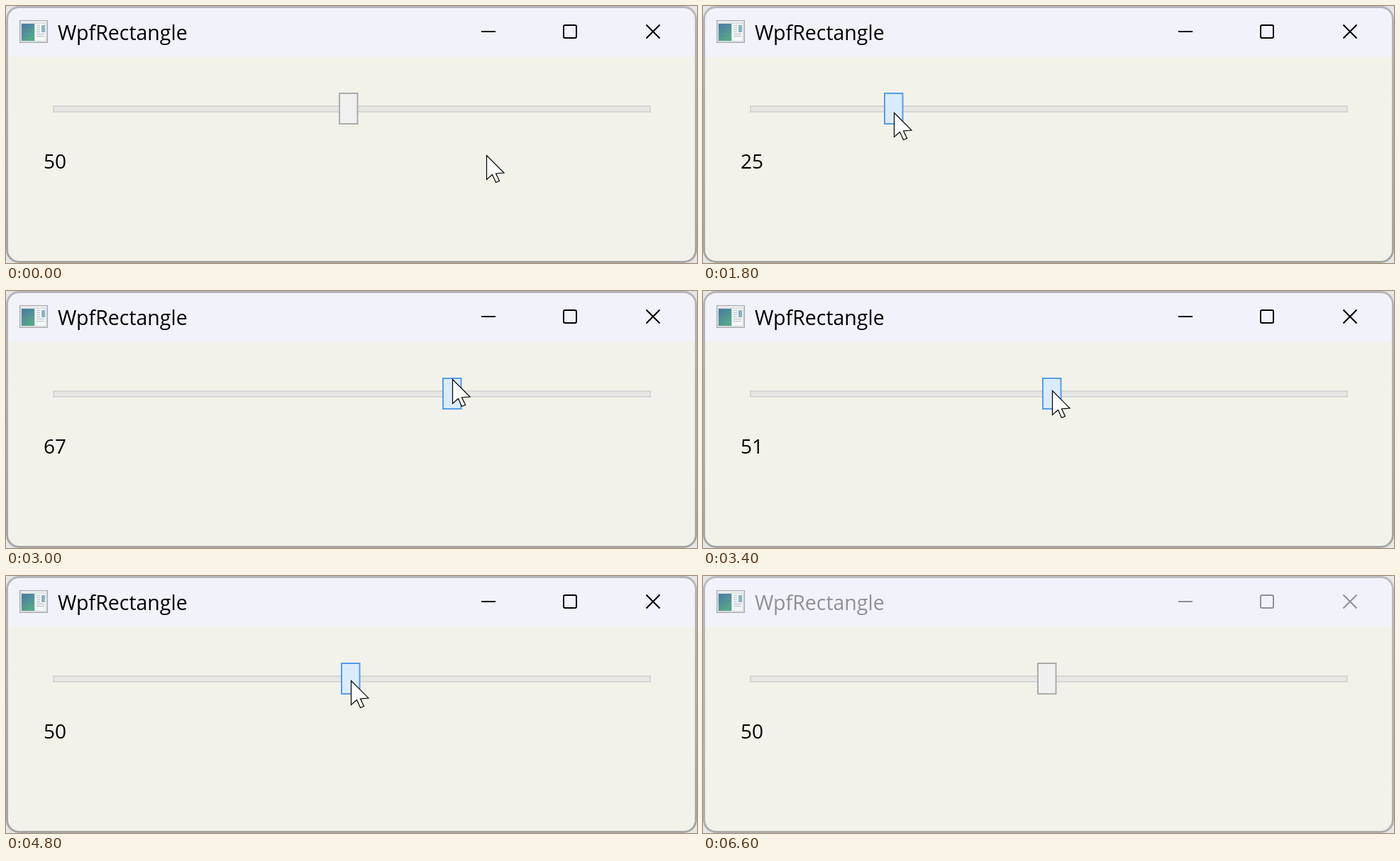
An HTML page for the animation above (6.8 s loop, 974 px wide and 362 px high).

```html
<!DOCTYPE html>
<html lang="en">
<head>
<meta charset="utf-8">
<title>Slider window</title>
<style>
  html, body { margin: 0; width: 100%; height: 100%; overflow: hidden; background: #e6e6e6; }
  svg { display: block; width: 974px; height: 362px; }
  text { font-family: "Open Sans", "Noto Sans", sans-serif; }
  #chrome { --ink: #000; }
  #chrome text { fill: var(--ink); font-size: 28.5px; }
  #chrome path, #chrome rect { fill: none; stroke: var(--ink); stroke-width: 2; }
  #thumb { stroke-width: 2; }
  .normal { fill: #f0f0f1; stroke: #acacac; }
  .hover { fill: #dcebfc; stroke: #7eb4ea; }
  .pressed { fill: #daecfc; stroke: #569de5; }
</style>
</head>
<body>
<svg viewBox="0 0 974 362">
  <defs>
    <linearGradient id="pane" x2="0.6" y2="1">
      <stop stop-color="#4a78a8"/><stop offset="1" stop-color="#55a886"/>
    </linearGradient>
    <linearGradient id="edge" x2="0" y2="1">
      <stop stop-color="#b6b6ba"/><stop offset="1" stop-color="#a6a6a6"/>
    </linearGradient>
    <clipPath id="frame"><rect x="1" y="1" width="972" height="360" rx="17"/></clipPath>
  </defs>

  <g clip-path="url(#frame)">
    <rect width="974" height="362" fill="#f2f2ea"/>
    <rect width="974" height="71.5" fill="#f2f2fb"/>
  </g>
  <rect id="border" x="1.5" y="1.5" width="971" height="359" rx="17" fill="none" stroke="url(#edge)" stroke-width="3"/>

  <g id="icon">
    <rect x="19.5" y="20.5" width="39" height="31" fill="#d6d9dc" stroke="#a3a6a9"/>
    <rect x="21" y="21" width="36" height="3" fill="#e9ebed"/>
    <rect x="22" y="25" width="18" height="24" fill="url(#pane)"/>
    <rect x="41" y="25" width="15" height="24" fill="#f4f6f7"/>
    <path d="M43 27.500h5M43 30.500h5M43 33.500h5M43 36.500h5M43 39.500h11M43 42.500h11" stroke="#b4bcc4"/>
    <rect x="50" y="27" width="5" height="10" fill="#86b6c4"/>
  </g>

  <g id="chrome">
    <text x="73" y="48">WpfRectangle</text>
    <path d="M670 36h20M902.500 26.500l19 19m0-19l-19 19"/>
    <rect x="786" y="27" width="18" height="18" rx="2"/>
  </g>

  <rect x="67" y="141" width="841" height="8" fill="#e8e7e4" stroke="#d7d6d6" stroke-width="2"/>
  <rect id="thumb" y="123" width="25.500" height="43"/>
  <text id="value" x="53" y="229" font-size="28"></text>
  <path id="cursor" d="M0 0V34L8 27L13 38L18 36L13 25.500L24.500 24.500Z" fill="#fff" stroke="#000" stroke-width="1.2"/>
</svg>
<script>
const LOOP = 6800, STEP = 200;
const GRAB = 1200, RELEASE = 5800, BLUR = 6600;
// Pointer path: time, x, y
const path = [
  [0, 677, 210], [800, 493, 148], [1200, 483, 149], [1800, 269, 150],
  [2600, 765, 107], [3400, 492, 140], [3800, 498, 145], [4800, 486, 147],
  [5000, 476, 147], [5200, 485, 147], [LOOP, 485, 147]
];
const [chrome, border, thumb, value, cursor] =
  ["chrome", "border", "thumb", "value", "cursor"].map(id => document.getElementById(id));

function pointerAt(t) {
  const i = path.findIndex(key => key[0] > t);
  const [t0, x0, y0] = path[i - 1], [t1, x1, y1] = path[i];
  const u = (t - t0) / (t1 - t0), k = u * u * (3 - 2 * u);
  return [x0 + (x1 - x0) * k, y0 + (y1 - y0) * k];
}

function thumbState(t) {
  if (t < 800 || t >= RELEASE) return "normal";
  return t < GRAB ? "hover" : "pressed";
}

function draw() {
  const t = Math.floor(performance.now() % LOOP / STEP) * STEP;
  const [x, y] = pointerAt(t).map(Math.round);
  const center = t < GRAB ? 483 : x;
  const inactive = t >= BLUR;

  thumb.setAttribute("x", center - 13);
  thumb.setAttribute("class", thumbState(t));
  value.textContent = Math.round((center - 55.5) / 8.55);
  cursor.setAttribute("transform", `translate(${x + 0.5} ${y + 0.5})`);
  cursor.style.display = t < RELEASE ? "" : "none";
  chrome.style.setProperty("--ink", inactive ? "#919193" : "#000");
  border.style.opacity = inactive ? 0.9 : 1;
  requestAnimationFrame(draw);
}
draw();
</script>
</body>
</html>
```
